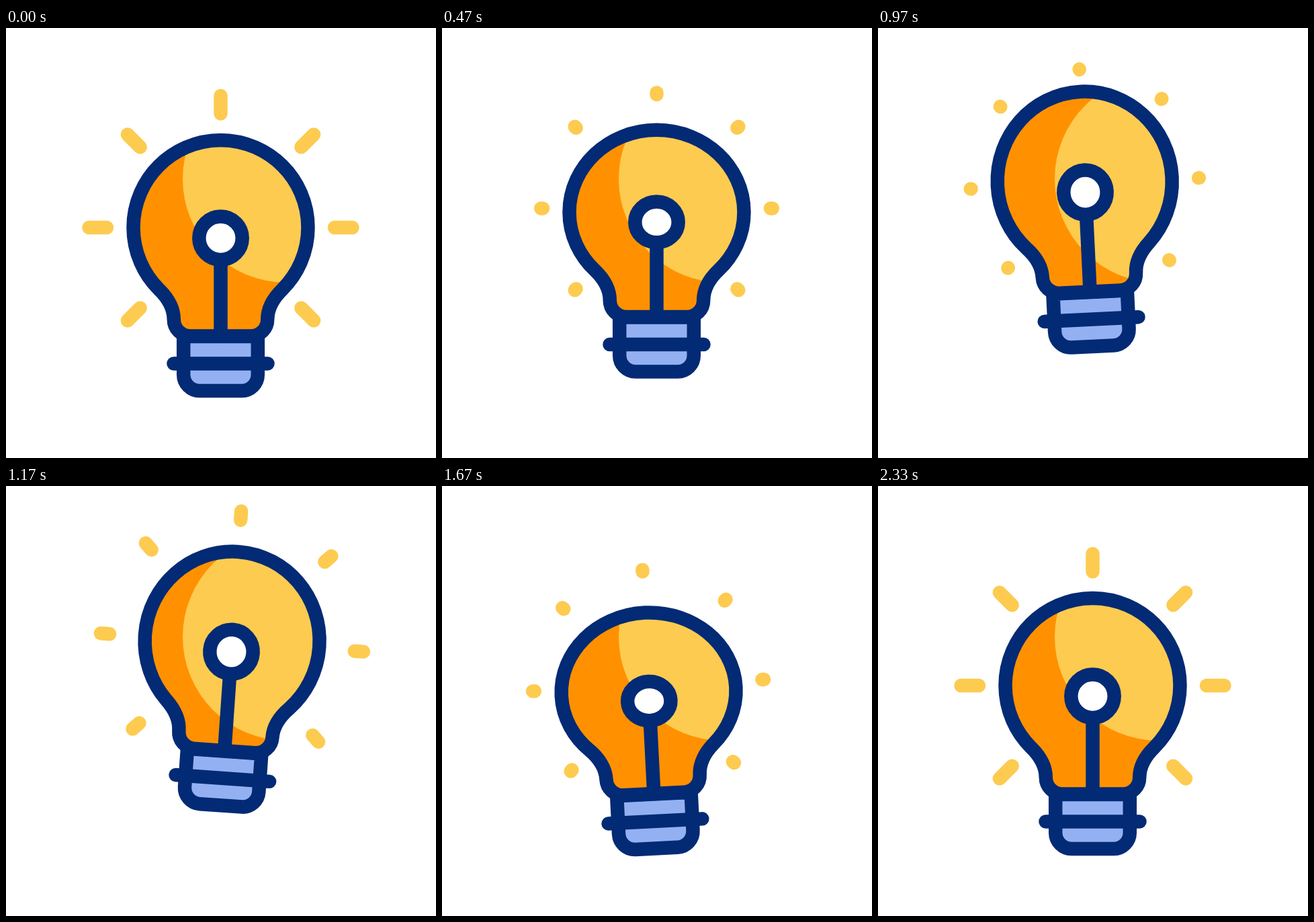
These frames come from a looping animation (640x640 px, 2.37 s). An HTML page with a canvas:

```html
<!DOCTYPE html>
<html lang="en">
<head>
<meta charset="utf-8">
<title>Light bulb</title>
<style>
html, body { margin: 0; width: 100%; height: 100%; overflow: hidden; background: #fff; }
canvas { display: block; width: 640px; height: 640px; }
</style>
</head>
<body>
<canvas id="stage" width="640" height="640"></canvas>
<script>
const ctx = document.getElementById('stage').getContext('2d');
const NAVY = '#032a74', ORANGE = '#ff9100', YELLOW = '#fdcb50', BLUE = '#93b1f2';
const LOOP = 2370, STROKE = 20.5;
const CX = 319.5, CY = 297, R = 130;
const PIVOT_Y = 540, NECK_Y = 393;

// Keys are [tick, value], 30 ticks per second.
const LIFT = [[6.5, 0], [23, -66], [33.5, -66], [51, 0]];
const SQUASH = [[0, 1], [7, .88], [23, 1.03], [33, 1.03], [48.5, .895], [57, 1]];
const TILT = [[21, 0], [27, -4], [35, 4], [51, -3], [58, 0]];
// Each burst: the tip leaves the inner end, then the tail follows it outwards.
const BURSTS = [[-10, 0], [13, 17], [28.5, 32.5], [49, 99]];
const BURST_TIME = 5;

const smooth = x => {
  x = Math.min(1, Math.max(0, x));
  return x * x * (3 - 2 * x);
};

function track(keys, tick) {
  let value = keys[0][1];
  for (let i = 1; i < keys.length; i++) {
    const [from, a] = keys[i - 1], [to, b] = keys[i];
    if (tick >= from) value = a + (b - a) * smooth((tick - from) / (to - from));
  }
  return value;
}

function stroke(path, color = NAVY) {
  ctx.strokeStyle = color;
  ctx.stroke(path);
}

function line(x1, y1, x2, y2, color) {
  const path = new Path2D();
  path.moveTo(x1, y1);
  path.lineTo(x2, y2);
  stroke(path, color);
}

function drawRays(tick) {
  for (const [tipStart, tailStart] of BURSTS) {
    const tip = smooth((tick - tipStart) / BURST_TIME);
    const tail = smooth((tick - tailStart) / BURST_TIME);
    if (tip <= 0 || tail >= 1) continue;
    const inner = 169.5 + 26.5 * tail, outer = 169.5 + 26.5 * tip;
    for (let i = 0; i < 7; i++) {
      const angle = (i + 3) * Math.PI / 4;
      const c = Math.cos(angle), s = Math.sin(angle);
      line(CX + c * inner, CY + s * inner, CX + c * outer, CY + s * outer, YELLOW);
    }
  }
}

function drawCap() {
  const cap = new Path2D();
  cap.moveTo(CX - 55.3, 459);
  cap.arcTo(CX - 55.3, 540, CX, 540, 24);
  cap.arcTo(CX + 55.3, 540, CX + 55.3, 459, 24);
  cap.lineTo(CX + 55.3, 459);
  cap.closePath();
  ctx.fillStyle = BLUE;
  ctx.fill(cap);
  stroke(cap);
  line(CX - 70, 499.5, CX + 70, 499.5);
}

function drawGlass(squash, toStage) {
  const bend = y => y < NECK_Y ? NECK_Y + (y - NECK_Y) * squash : y;
  const glass = new Path2D();
  glass.ellipse(CX, bend(CY), R, R * squash, 0, .75 * Math.PI, 2.25 * Math.PI);
  glass.bezierCurveTo(CX + 79.5, 401, CX + 69.7, 417, CX + 69.7, 434);
  glass.arcTo(CX + 69.7, 458.5, CX, 458.5, 24.5);
  glass.arcTo(CX - 69.7, 458.5, CX - 69.7, 434, 24.5);
  glass.lineTo(CX - 69.7, 434);
  glass.bezierCurveTo(CX - 69.7, 417, CX - 79.5, 401, CX - R * Math.SQRT1_2, bend(CY + R * Math.SQRT1_2));
  glass.closePath();

  ctx.fillStyle = ORANGE;
  ctx.fill(glass);
  // The highlight stays still on the stage while the glass moves over it.
  ctx.save();
  ctx.clip(glass);
  ctx.setTransform(toStage);
  ctx.fillStyle = YELLOW;
  ctx.beginPath();
  ctx.arc(417.5, 224.5, 154.5, 0, 2 * Math.PI);
  ctx.fill();
  ctx.restore();
  stroke(glass);

  line(CX, bend(345), CX, 458);
  const ring = new Path2D();
  ring.ellipse(CX, bend(312.7), 32.2, 32.2 * squash, 0, 0, 2 * Math.PI);
  ctx.fillStyle = '#fff';
  ctx.fill(ring);
  stroke(ring);
}

function draw(time) {
  const tick = Math.floor((time % LOOP + 4) * .03);
  ctx.fillStyle = '#fff';
  ctx.fillRect(0, 0, 640, 640);
  ctx.lineWidth = STROKE;
  ctx.lineCap = ctx.lineJoin = 'round';
  ctx.save();
  const toStage = ctx.getTransform();
  ctx.translate(CX, PIVOT_Y + track(LIFT, tick));
  ctx.rotate(track(TILT, tick) * Math.PI / 180);
  ctx.translate(-CX, -PIVOT_Y);
  drawRays(tick);
  drawCap();
  drawGlass(track(SQUASH, tick), toStage);
  ctx.restore();
}

const start = performance.now();
function loop() {
  draw(performance.now() - start);
  requestAnimationFrame(loop);
}
loop();
</script>
</body>
</html>
```
